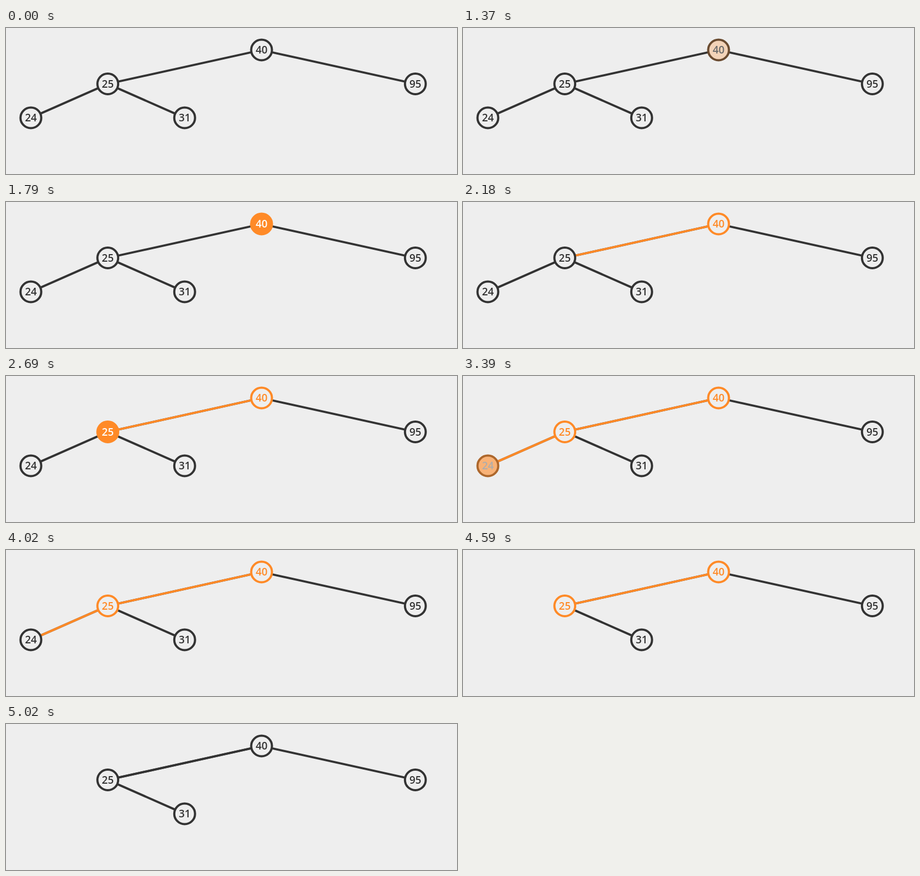
An HTML page for the animation above (5.49 s loop, 825 by 269 pixels).

```html
<!DOCTYPE html>
<html lang="en">
<head>
<meta charset="utf-8">
<title>Binary search tree: remove a leaf</title>
<style>
  html, body { margin: 0; width: 100%; height: 100%; overflow: hidden; background: #eee; }
  svg { display: block; width: 825px; height: 269px; }
  circle { stroke-width: 4; }
  text { font-family: "Open Sans", "Noto Sans", sans-serif; font-weight: 600; text-anchor: middle; }
</style>
</head>
<body>
<svg id="stage" viewBox="0 0 825 269"></svg>
<script>
const LOOP = 5490, DUR = 250, R = 19, FONT = 19, MIN_FONT = 12;
const GREY = [238, 238, 238], DARK = [51, 51, 51], ORANGE = [255, 138, 39], WHITE = [255, 255, 255];

// Each style: fill, outline, label
const PLAIN = [GREY, DARK, DARK];
const ACTIVE = [ORANGE, ORANGE, WHITE];
const VISITED = [GREY, ORANGE, ORANGE];

// The picture is refreshed only at these moments
const TICKS = [0, 1370, 1490, 1640, 1790, 1910, 2060, 2180, 2330, 2450, 2570, 2690, 2840, 2970,
  3110, 3240, 3390, 3510, 3750, 3870, 4020, 4170, 4320, 4440, 4590, 4740, 4870, 5020];

const REMOVE = 4257, RESET = 4730;

const nodes = {
  40: { x: 467.5, y: 40.5, steps: [[1268, ACTIVE], [1768, VISITED], [RESET, PLAIN]] },
  25: { x: 186.2, y: 103, steps: [[2265, ACTIVE], [2760, VISITED], [RESET, PLAIN]] },
  95: { x: 748.8, y: 103, steps: [] },
  24: { x: 45.5, y: 165.5, steps: [[3256, ACTIVE], [3742, PLAIN]], gone: REMOVE },
  31: { x: 326.8, y: 165.5, steps: [] }
};
const edges = [
  { from: 40, to: 25, lit: 1768 },
  { from: 40, to: 95 },
  { from: 25, to: 24, lit: 2760, gone: REMOVE },
  { from: 25, to: 31 }
];

const stage = document.getElementById("stage");
const add = (tag, parent) =>
  parent.appendChild(document.createElementNS("http://www.w3.org/2000/svg", tag));
const set = (el, attrs) => {
  for (const k in attrs) el.setAttribute(k, attrs[k]);
};

const clamp = v => Math.min(1, Math.max(0, v));
const ease = v => v < 0.5 ? 4 * v ** 3 : 1 - 4 * (1 - v) ** 3;
const progress = (t, start, dur = DUR) => start === undefined ? 0 : ease(clamp((t - start) / dur));
const mix = (a, b, p) => a.map((v, i) => v + (b[i] - v) * p);
const css = c => `rgb(${c.map(Math.round).join(",")})`;

for (const e of edges) {
  e.base = add("line", stage);
  e.over = add("line", stage);
}
for (const key in nodes) {
  const n = nodes[key];
  n.ring = add("circle", stage);
  n.label = add("text", stage);
  n.label.textContent = key;
  set(n.ring, { cx: n.x, cy: n.y });
  set(n.label, { x: n.x, y: n.y + 6.5 });
}

// Draws the given share of an edge, starting at the parent's rim
function drawLine(el, a, b, share, width, color) {
  const rim = 20 / Math.hypot(b.x - a.x, b.y - a.y);
  const at = k => [a.x + (b.x - a.x) * k, a.y + (b.y - a.y) * k];
  const [x1, y1] = at(rim);
  const [x2, y2] = at(rim + (1 - 2 * rim) * share);
  set(el, { x1, y1, x2, y2, stroke: css(color), "stroke-width": share > 0 ? width : 0 });
}

function drawEdge(e, t) {
  const a = nodes[e.from], b = nodes[e.to];
  const left = 1 - progress(t, e.gone);
  drawLine(e.base, a, b, left, 4, DARK);
  if (!e.lit) return;
  const grown = progress(t, e.lit);
  const width = 10 - 6 * progress(t, e.lit + DUR, 150);
  const color = e.gone ? ORANGE : mix(ORANGE, DARK, progress(t, RESET));
  drawLine(e.over, a, b, grown * left, width, color);
}

function drawNode(n, t) {
  let style = PLAIN;
  for (const [start, next] of n.steps) {
    const p = progress(t, start);
    style = style.map((c, i) => mix(c, next[i], p));
  }
  const [fill, stroke, ink] = style.map(css);
  const left = 1 - progress(t, n.gone);
  const display = left > 0 ? "inline" : "none";
  set(n.ring, { r: R * left, fill, stroke, display });
  set(n.label, { fill: ink, display, "font-size": Math.max(MIN_FONT, FONT * left) });
}

function render(now) {
  const time = now % LOOP;
  const t = TICKS.filter(v => v <= time).pop() || 0;
  edges.forEach(e => drawEdge(e, t));
  Object.values(nodes).forEach(n => drawNode(n, t));
}

const begin = performance.now();
function frame() {
  render(performance.now() - begin);
  requestAnimationFrame(frame);
}
frame();
</script>
</body>
</html>
```
